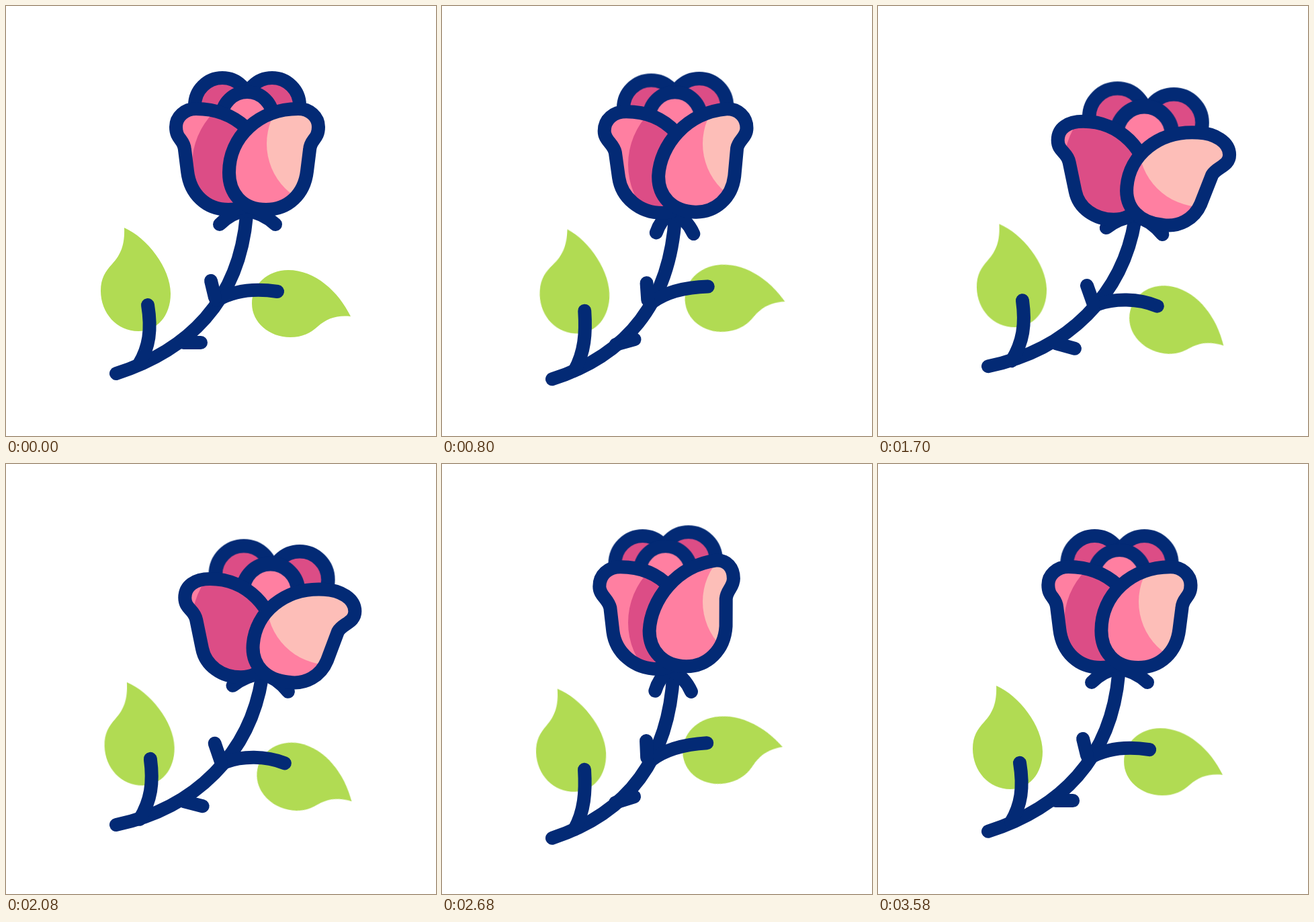
Animation, 640 px wide and 640 px high, one loop 3.6 s. Source, as an HTML page without scripts:

```html
<!DOCTYPE html>
<html lang="en">
<head>
<meta charset="utf-8">
<title>Swaying rose</title>
<style>
  html, body { margin: 0; width: 100%; height: 100%; overflow: hidden; background: #fff; }
  svg { display: block; width: 100vw; height: 100vh; }

  .line { fill: none; stroke: #032a75; stroke-width: 20; stroke-linecap: round; stroke-linejoin: round; }
  .pink { fill: #ff7fa1; }
  .rose { fill: #dc4d86; }
  .peach { fill: #fdbeb8; }
  .leaf { fill: #b1db53; }

  /* Poses: --n rest, --l leaning left, --r leaning right */
  .stem > path { animation: sway 3.6s infinite; }
  .petal { animation: bloom 3.6s infinite; }
  .lobe, .leaf { animation: drift 3.6s infinite; }
  .stem > .sepals { animation: sepals 3.6s infinite; }

  /* Easing is literal here: custom properties do not resolve for timing functions in keyframes */
  @keyframes sway {
    0% { d: var(--n); animation-timing-function: cubic-bezier(.7, 0, .5, 1); }
    18.9% { d: var(--l); animation-timing-function: cubic-bezier(.25, 0, .06, 1); }
    52.8% { d: var(--r); animation-timing-function: cubic-bezier(.6, 0, .65, 1); }
    75.8% { d: var(--l); animation-timing-function: cubic-bezier(.2, .2, 0, 1.75); }
    100% { d: var(--n); }
  }
  @keyframes bloom {
    0% { d: var(--n); animation-timing-function: cubic-bezier(.7, 0, .5, 1); }
    16.8% { d: var(--l); animation-timing-function: cubic-bezier(.25, 0, .06, 1); }
    52.8% { d: var(--r); animation-timing-function: cubic-bezier(.6, 0, .65, 1); }
    75.8% { d: var(--l); animation-timing-function: cubic-bezier(.2, .2, 0, 1.75); }
    100% { d: var(--n); }
  }
  @keyframes drift {
    0% { transform: translate(0, 0); animation-timing-function: cubic-bezier(.7, 0, .5, 1); }
    16.8% { transform: var(--l); animation-timing-function: cubic-bezier(.25, 0, .06, 1); }
    52.8% { transform: var(--r); animation-timing-function: cubic-bezier(.6, 0, .65, 1); }
    75.8% { transform: var(--back, var(--l)); animation-timing-function: cubic-bezier(.2, .2, 0, 1.75); }
    100% { transform: translate(0, 0); }
  }
  @keyframes sepals {
    0% { d: var(--n); animation-timing-function: cubic-bezier(.7, 0, .5, 1); }
    18.9% { d: var(--l); animation-timing-function: cubic-bezier(.25, 0, .06, 1); }
    52.8% { d: var(--r); animation-timing-function: ease-in; }
    65.6% { d: var(--mid); animation-timing-function: ease-out; }
    75.8% { d: var(--l); animation-timing-function: ease-in-out; }
    83.9% { d: var(--end); animation-timing-function: ease-in-out; }
    100% { d: var(--n); }
  }

  .stalk {
    --n: path("M164 547C270 513 347 440 358 312");
    --l: path("M164 557C267 523 337 449 344 312");
    --r: path("M164 536C283 512 365 429 383 318");
  }
  .twig-right {
    --n: path("M314 438C340 423 372 420 404 425");
    --l: path("M311 441C333 424 362 417 394 415");
    --r: path("M327 444C353 435 387 435 416 447");
  }
  .twig-left {
    --n: path("M211 445C217 482 213 508 198 533");
    --l: path("M212 455C214 488 212 517 197 544");
    --r: path("M215 438C220 474 216 500 199 528");
  }
  .thorn-high {
    --n: path("M305 409L311 434");
    --l: path("M304 412L305 437");
    --r: path("M311 416L321 444");
  }
  .thorn-low {
    --n: path("M290 501L264 501");
    --l: path("M286 495L258 504");
    --r: path("M293 510L265 502");
  }
  .sepals {
    --n: path("M318 325Q335 308 357 304Q382 308 401 325");
    --l: path("M317 338Q322 319 338 305Q360 316 370 339");
    --r: path("M340 330Q358 316 384 312Q408 320 424 340");
    --mid: path("M328 329Q345 315 370 308Q392 316 404 334");
    --end: path("M324 328Q336 312 358 304Q382 314 394 333");
  }

  .petal-left {
    --n: path("M331 303C368 303 386 277 386 248C386 195 342 153 283 153C266 153 253 165 253 180C253 199 265 198 266 214L270 246C274 280 298 303 331 303Z");
    --l: path("M321 305C350 305 364 277 364 248C364 203 331 153 265 153C247 153 234 165 234 182C234 196 247 200 250 214L254 249C258 280 285 305 321 305Z");
    --r: path("M351 318C386 318 403 286 403 263C401 216 361 172 306 172C283 172 268 182 268 200C268 217 282 217 285 233L294 276C299 301 323 318 351 318Z");
  }
  .petal-right {
    --n: path("M387 303C350 303 332 277 332 248C332 195 376 153 435 153C452 153 465 165 465 180C465 199 453 198 452 214L448 246C444 280 420 303 387 303Z");
    --l: path("M363 301C328 301 308 277 308 248C310 203 347 151 408 143C423 142 433 154 433 170C433 183 423 187 422 200L422 241C420 277 394 301 363 301Z");
    --r: path("M424 326C390 323 368 301 371 269C375 223 417 185 477 189C502 190 524 203 524 222C524 239 505 240 498 252L481 295C471 318 448 330 424 326Z");
  }

  .lobe-left { --l: translate(-24px, 0); --r: translate(35px, 17px) scale(1.03); transform-origin: 322px 148px; }
  .lobe-right { --l: translate(-30px, -6px); --r: translate(45px, 26px) scale(1.03); transform-origin: 396px 148px; }
  .lobe-mid { --l: translate(-27px, -6px); --r: translate(38px, 25px) scale(1.08); transform-origin: 359px 166px; }

  .leaf-left {
    --l: translate(4px, 6px) rotate(5deg);
    --r: translate(6px, -6px) rotate(-1deg);
    --back: translate(-1px, 4px) rotate(-2deg);
    transform-origin: 194px 425px;
  }
  .leaf-right {
    --l: translate(-8px, -17px) rotate(-15deg);
    --r: translate(8px, 24px) rotate(13deg);
    transform-origin: 420px 443px;
  }
</style>
</head>
<body>
<svg viewBox="0 0 640 640">
  <defs>
    <clipPath id="inside-left"><path class="petal petal-left"/></clipPath>
    <clipPath id="inside-right"><path class="petal petal-right"/></clipPath>
  </defs>

  <path class="leaf leaf-left" d="M176 330C210 345 245 390 245 428C245 462 224 484 197 484C165 484 141 457 141 424C141 405 148 395 158 384C171 370 177 355 176 330Z"/>
  <path class="leaf leaf-right" d="M513 462C495 425 460 393 420 393C389 393 366 415 366 443C366 471 392 493 423 493C441 493 453 487 464 477C478 465 492 460 513 462Z"/>

  <g class="stem line">
    <path class="stalk"/>
    <path class="twig-right"/>
    <path class="twig-left"/>
    <path class="thorn-high"/>
    <path class="thorn-low"/>
    <path class="sepals"/>
  </g>

  <circle class="line rose lobe lobe-left" cx="322" cy="148" r="41"/>
  <circle class="line rose lobe lobe-right" cx="396" cy="148" r="41"/>
  <circle class="line pink lobe lobe-mid" cx="359" cy="166" r="38"/>

  <g clip-path="url(#inside-left)">
    <rect class="pink" width="640" height="640"/>
    <circle class="rose" cx="387" cy="236" r="110"/>
  </g>
  <path class="line petal petal-left"/>

  <g clip-path="url(#inside-right)">
    <rect class="pink" width="640" height="640"/>
    <circle class="peach" cx="482" cy="205" r="94"/>
  </g>
  <path class="line petal petal-right"/>
</svg>
</body>
</html>
```
